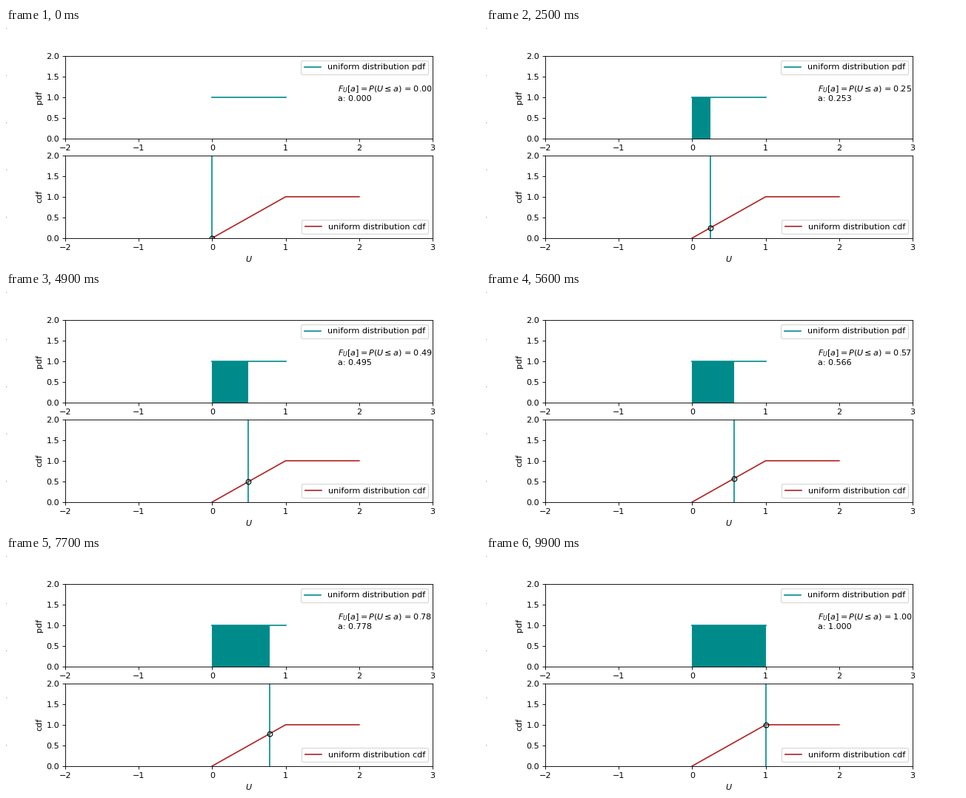
A matplotlib script for the animation above (10 s loop, 640x320 px).

```python
import numpy as np
import matplotlib.pyplot as plt
from matplotlib.animation import FuncAnimation

STEPS = 100
TEAL, RED = "darkcyan", "firebrick"

fig = plt.figure(figsize=(8, 4), dpi=80)

# Frameless full-size axes: only its tick marks show at the left edge
fig.add_axes([0, 0, 1, 1], frameon=False)


def panel(row, ylabel):
    ax = fig.add_subplot(2, 1, row)
    ax.set(xlim=(-2, 3), ylim=(0, 2), ylabel=ylabel)
    ax.set_yticks(np.arange(0, 2.1, 0.5))
    return ax


pdf_ax = panel(1, "pdf")
cdf_ax = panel(2, "cdf")
cdf_ax.set_xlabel("$U$")

x = np.linspace(0, 1, STEPS)
pdf_ax.plot([0, 1], [1, 1], color=TEAL, label="uniform distribution pdf")
cdf_ax.plot([0, 1, 2], [0, 1, 1], color=RED, label="uniform distribution cdf")
pdf_ax.legend(loc="upper right")
cdf_ax.legend(loc="lower right")

cursor = cdf_ax.axvline(0, color=TEAL)
dot, = cdf_ax.plot([0], [0], "o", color="black", markerfacecolor="none")
readout = fig.text(0.7, 0.69, "")
area = []


def update(i):
    a = x[i]
    while area:
        area.pop().remove()
    if i:
        area.append(pdf_ax.fill_between(x[:i], 0, 1, color=TEAL))
    cursor.set_xdata([a, a])
    dot.set_data([a], [a])
    readout.set_text(f"$F_U[a] = P(U \\leq a)$ = {a:.2f}\na: {a:.3f}")
    return [cursor, dot, readout, *area]


anim = FuncAnimation(fig, update, frames=STEPS, interval=100,
                     repeat=True, repeat_delay=0, blit=False)
plt.show()
```
